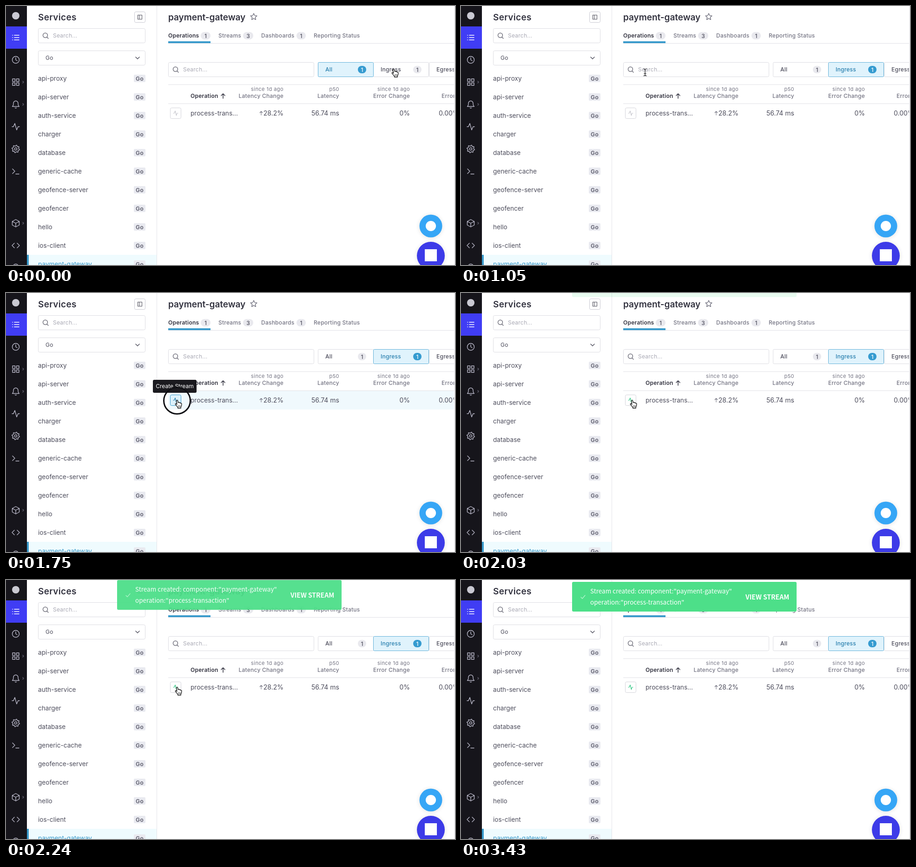
Animation, 966 px wide and 558 px high, one loop 3.5 s. Source, as an HTML page with a canvas:

```html
<!DOCTYPE html>
<html lang="en">
<head>
<meta charset="utf-8">
<title>Services</title>
<style>
html, body { margin: 0; width: 966px; height: 558px; overflow: hidden; background: #fff; }
canvas { display: block; }
</style>
</head>
<body>
<canvas id="stage" width="966" height="558"></canvas>
<script>
const ctx = document.getElementById('stage').getContext('2d');
const LOOP = 3500, STEP = 70;
const INK = '#32323f', BODY = '#4d4d5c', MUTED = '#747483', HINT = '#a9a9b4';
const LINE = '#dcdce2', BLUE = '#3a9bcc', PALE = '#e0f3fc', NAV = '#b9b8c8', GREEN = '#3cc98a';
const UI = 'Inter, sans-serif', TOAST = '"Noto Sans CJK JP", "Noto Sans CJK", "Noto Sans", sans-serif';

const clamp = v => Math.max(0, Math.min(1, v));
const span = (t, a, b) => clamp((t - a) / (b - a));
const smooth = p => p * p * (3 - 2 * p);
const mix = (a, b, p) => a + (b - a) * p;

function text(s, x, y, size, weight, color, o = {}) {
  ctx.font = `${weight} ${size}px ${o.font || UI}`;
  ctx.letterSpacing = (o.gap ?? size * 0.02) + 'px';
  ctx.textAlign = o.align || 'left';
  ctx.fillStyle = color;
  ctx.fillText(s, x, y);
}

function rect(x, y, w, h, color) {
  ctx.fillStyle = color;
  ctx.fillRect(x, y, w, h);
}

function box(x, y, w, h, r, fill, stroke) {
  ctx.beginPath();
  const e = stroke ? 0.5 : 0;
  ctx.roundRect(x + e, y + e, w - 2 * e, h - 2 * e, r);
  if (fill) { ctx.fillStyle = fill; ctx.fill(); }
  if (stroke) { ctx.strokeStyle = stroke; ctx.lineWidth = 1; ctx.stroke(); }
}

function disc(x, y, r, color) {
  ctx.beginPath();
  ctx.arc(x, y, r, 0, 7);
  ctx.fillStyle = color;
  ctx.fill();
}

function shadow(alpha, blur) {
  ctx.shadowColor = `rgba(0,0,0,${alpha})`;
  ctx.shadowBlur = blur;
  ctx.shadowOffsetY = 1;
}

// Strokes (and optionally fills) SVG path data placed at x, y.
function path(d, x, y, color, width = 1.4, fill) {
  const p = new Path2D(d);
  ctx.save();
  ctx.translate(x, y);
  ctx.lineCap = ctx.lineJoin = 'round';
  if (fill) { ctx.fillStyle = fill; ctx.fill(p); }
  ctx.strokeStyle = color;
  ctx.lineWidth = width;
  ctx.stroke(p);
  ctx.restore();
}

const PULSE = 'M-8 0H-5L-2 -7L2 7L5 0H8';
const MINI = 'M-5 0H-3L-1 -5L1.5 5L3 0H5';
const LENS = 'M4.5 -.8A5 5 0 1 1 -5.5 -.8A5 5 0 1 1 4.5 -.8M3 3L6 6';
const STAR = 'M0 -7L2.1 -2.4L7 -1.9L3.3 1.5L4.4 6.4L0 3.9L-4.4 6.4L-3.3 1.5L-7 -1.9L-2.1 -2.4Z';
const HAND = 'M-1.5 1.2C-1.3 -.6 1.1 -.5 1.4 1.2L2.3 5.2C3 4 5 4.3 5.2 5.7C6 4.9 7.6 5.3 7.8 6.7' +
  'C9 6.1 10 7 9.9 8.4L9.4 12.4L8.2 14.5V17H1.6V15.3L-1.4 11.6L-3.6 8.9C-4.2 7.4 -2.4 6.7 -1.2 8L-.2 9Z';
const KNUCKLES = 'M2.8 11.5V14.2M4.8 11.5V14.2M6.8 11.5V14.2';
const BEAM = 'M-3 -7.5Q0 -7.5 0 -5.5Q0 -7.5 3 -7.5M0 -5.5V5.5M-2 2.5H2M-3 7.5Q0 7.5 0 5.5Q0 7.5 3 7.5';

function gear() {
  let d = '';
  for (let i = 0; i < 32; i++) {
    const a = (i + 0.5) * Math.PI / 16, r = i % 4 < 2 ? 8.2 : 6.2;
    d += `${i ? 'L' : 'M'}${r * Math.cos(a)} ${r * Math.sin(a)}`;
  }
  return d + 'ZM2.6 0A2.6 2.6 0 1 1 -2.6 0A2.6 2.6 0 1 1 2.6 0';
}

const NAV_ICONS = [
  [116, 'M7.5 0A7.5 7.5 0 1 1 -7.5 0A7.5 7.5 0 1 1 7.5 0M0 -4.5V0L3 2'],
  [164, 'M-7 -7H-1.5V-1.5H-7ZM1.5 -7H7V-1.5H1.5ZM-7 1.5H-1.5V7H-7ZM1.5 1.5H7V7H1.5Z'],
  [212, 'M-7.5 4.5C-5 3 -5 0 -5 -2.5A5 5 0 0 1 5 -2.5C5 0 5 3 7.5 4.5ZM-1.5 7.5Q0 8.5 1.5 7.5'],
  [260, PULSE],
  [308, gear()],
  [356, 'M-7 -5L-2 0L-7 5M0 6H7'],
  [468, 'M0 -8L7.5 -4V4L0 8L-7.5 4V-4ZM-7.5 -4L0 0L7.5 -4M0 0V8'],
  [516, 'M-3 -5L-8 0L-3 5M3 -5L8 0L3 5'],
  [562, 'M6 0A6 6 0 1 1 -6 0A6 6 0 1 1 6 0']
];

function nav() {
  rect(0, 0, 45, 558, '#16151b');
  disc(21, 21, 8, '#c9c9d2');
  rect(0, 44, 45, 48, '#403df4');
  for (const y of [-5, 0, 5]) path(`M-7 ${y}H-6.6M-3 ${y}H7`, 21, 68, '#fff', 1.6);
  for (const [y, d] of NAV_ICONS) path(d, 21, y, NAV);
  for (const y of [164, 212, 468]) path('M-1 -2L1 0L-1 2', 37, y, '#6c6b7a', 1.2);
}

function searchBox(x, y, w) {
  box(x, y, w, 32, 3, '#fff', LINE);
  path(LENS, x + 16, y + 16, '#62626f', 1.3);
  text('Search...', x + 32, y + 20, 12, 400, HINT);
}

function services() {
  text('Services', 69, 31, 19, 600, INK, { gap: 0.3 });
  box(276, 12, 24, 24, 3, '#fff', '#c9c9d2');
  path('M-4.5 -4.5H4.5V4.5H-4.5ZM-1.2 -4.5V4.5', 288, 24, '#555562', 1.1);
  searchBox(69, 48, 231);
  box(69, 96, 231, 32, 3, '#fff', LINE);
  text('Go', 85, 116, 12, 400, BODY);
  path('M-4 -2L0 2L4 -2', 283, 112, '#555562', 1.5);
  const names = ['api-proxy', 'api-server', 'auth-service', 'charger', 'database', 'generic-cache',
    'geofence-server', 'geofencer', 'hello', 'ios-client', 'payment-gateway'];
  names.forEach((name, i) => {
    const y = 156 + i * 40, on = i === names.length - 1;
    if (on) {
      rect(45, 536, 279, 22, '#effbfe');
      rect(45, 536, 4, 22, BLUE);
    }
    text(name, 69, y + 5, 13.6, 400, on ? BLUE : BODY, { gap: 0 });
    box(275, y - 8, 25, 16, 2, '#e9eaf0');
    text('Go', 287.7, y + 4.5, 12, 600, '#5b5b6b', { align: 'center', gap: 0.5 });
  });
  rect(324, 0, 1, 558, '#e4e4e9');
}

function pill(x, y, w, s, on) {
  box(x, y - 8, w, 16, 8, on ? '#359bd0' : '#e9e9ee');
  text(s, x + w / 2, y + 4.5, 12, 500, on ? '#fff' : BODY, { align: 'center', gap: 0 });
}

function filter(x, w, label, on) {
  box(x, 121, w, 32, 2, on ? PALE : '#fff', on ? '#62b1d9' : LINE);
  text(label, x + 16, 141, 12, 500, on ? '#287fae' : BODY);
  pill(x + w - 34, 137, 18, '1', on);
}

function header() {
  text('payment-gateway', 349, 31, 19, 600, INK, { gap: -0.05 });
  path(STAR, 533, 23, '#6d6d7b', 1.3);
  text('Operations', 349, 68, 12, 600, INK);
  text('Streams', 457, 68, 12, 500, MUTED);
  text('Dashboards', 549, 68, 12, 500, MUTED);
  text('Reporting Status', 662, 68, 12, 500, MUTED);
  pill(419, 64, 21, '1');
  pill(510, 64, 22, '3');
  pill(625, 64, 20, '1');
  rect(349, 80, 617, 1, '#e1e1e6');
  rect(349, 76, 91, 4, BLUE);
}

function table(s) {
  searchBox(349, 121, 314);
  filter(910, 119, 'Egress', false);
  if (s.ingress) { filter(671, 120, 'All', false); filter(790, 120, 'Ingress', true); }
  else { filter(790, 120, 'Ingress', false); filter(671, 120, 'All', true); }
  rect(349, 169, 617, 1, '#e1e1e6');
  if (s.hover) rect(349, 211, 617, 40, '#f0f9fd');
  rect(349, 210, 617, 1, '#e1e1e6');

  const end = { align: 'right' }, since = { align: 'right', gap: 0.45 }, cell = { align: 'right', gap: 0 };
  text('Operation', 397, 198, 12, 600, INK);
  path('M0 5V-5M-4 -1L0 -5L4 -1', 467, 194, INK, 1.5);
  text('since 1d ago', 597, 183, 11, 400, MUTED, since);
  text('Latency Change', 597, 198, 12, 500, MUTED, end);
  text('p50', 717, 183, 11, 400, MUTED, since);
  text('Latency', 717, 198, 12, 500, MUTED, end);
  text('since 1d ago', 869, 183, 11, 400, MUTED, since);
  text('Error Change', 869, 198, 12, 500, MUTED, end);
  text('Error', 937, 198, 12, 500, MUTED);

  box(353, 219, 24, 24, 3, s.hover ? '#dcf1fb' : '#fff', s.hover ? BLUE : '#d3d3da');
  path(MINI, 365, 231, s.created ? GREEN : s.hover ? '#287fae' : '#c9c9d0', 1.2);
  text('process-trans...', 397, 236, 13.6, 400, BODY, { gap: 0 });
  path('M0 4V-4M-3 -1L0 -4L3 -1', 549, 231, '#777785', 1.1);
  text('28.2%', 597, 236, 14, 400, BODY, cell);
  text('56.74 ms', 717, 236, 14, 400, BODY, cell);
  text('0%', 869, 236, 14, 400, BODY, cell);
  text('0.00%', 931, 236, 14, 400, BODY, { gap: 0 });
  rect(964, 0, 2, 558, '#fff');
  rect(965, 0, 1, 558, '#dedee3');
}

function bubbles() {
  ctx.save();
  shadow(0.12, 10);
  disc(914, 474, 24.5, '#36a6f6');
  disc(914, 538, 30, '#3d3be8');
  ctx.restore();
  disc(914, 474, 11, '#fff');
  rect(901, 524, 26, 26, '#fff');
}

function toast(t) {
  const p = 1 - (1 - span(t, 2010, 2310)) ** 2;
  if (!p) return;
  ctx.save();
  ctx.globalAlpha = p;
  ctx.translate(0, mix(-68, 0, p));
  box(239, 4, 483, 64, 3, '#4ddf89');
  path('M-4 0L-1 3L5 -4', 262, 37, '#b9f5d0', 1.2);
  const o = { font: TOAST, gap: 0 };
  text('Stream created: component:"payment-gateway"', 278, 29, 13.5, 500, '#fff', o);
  text('operation:"process-transaction"', 278, 53, 13.5, 500, '#fff', o);
  text('VIEW STREAM', 612, 42, 14, 700, '#fff', o);
  ctx.restore();
}

function tooltip() {
  box(316, 187, 94, 28, 3, '#1b1a1f');
  text('Create Stream', 363, 205, 12, 400, '#fff', { align: 'center', gap: 0 });
}

function ring(t, start, x, y) {
  const n = (t - start) / STEP;
  if (n < 0 || n >= 2) return;
  ctx.beginPath();
  ctx.arc(x, y, n < 1 ? 20 : 28.5, 0, 7);
  ctx.strokeStyle = '#101014';
  ctx.lineWidth = 3;
  ctx.stroke();
}

function pointer(t) {
  const a = smooth(span(t, 490, 1050)), b = smooth(span(t, 1050, 1610));
  const c = span(t, 2730, 3360) ** 2;
  return {
    x: mix(mix(834, 396, a), 368, b),
    y: mix(mix(136, 143, a), 231, b) + 340 * c
  };
}

function cursor({ x, y }) {
  if (x > 349 && x < 663 && y > 121 && y < 153) {
    path(BEAM, x, y, '#15151a', 1.2);
  } else {
    path(HAND, x, y, '#111', 1.3, '#fff');
    path(KNUCKLES, x, y, '#111', 0.8);
  }
}

function draw(t) {
  const p = pointer(t), created = t >= 1960;
  const hover = p.y > 211 && !created;
  rect(0, 0, 966, 558, '#fff');
  services();
  nav();
  header();
  table({ ingress: t >= 140, hover, created });
  bubbles();
  if (t >= 1610 && !created) tooltip();
  toast(t);
  ring(t, 70, 834, 137);
  ring(t, 1680, 368, 232);
  cursor(p);
}

function tick() {
  draw(Math.floor(performance.now() % LOOP / STEP) * STEP);
  requestAnimationFrame(tick);
}
tick();
</script>
</body>
</html>
```
